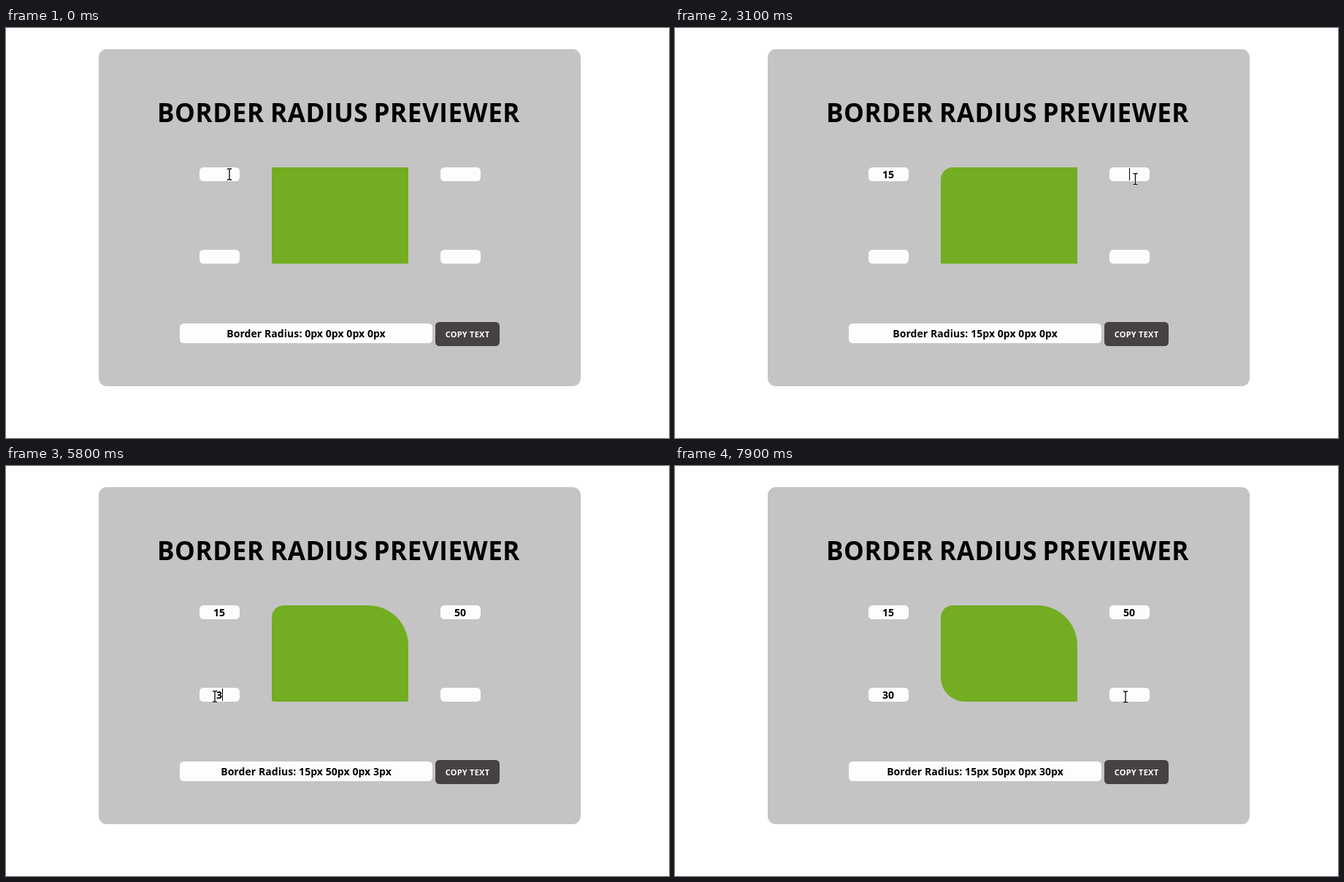
Recreate the animation shown at these times as an HTML page. Size 908x562 px, loop 8000 ms.

```html
<!DOCTYPE html>
<html lang="en">
<head>
<meta charset="utf-8">
<title>Border radius previewer</title>
<style>
  html, body { margin: 0; width: 100%; height: 100%; overflow: hidden; background: #fff; }
  div, svg { position: absolute; }
  #panel { left: 127px; top: 29px; width: 660px; height: 462px; border-radius: 11px; background: #c4c4c4; }
  #box { left: 364px; top: 191px; width: 187px; height: 132px; background: #73ad21; }
  svg { left: 0; top: 0; }
  text { font: bold 14px "Open Sans", "Noto Sans", sans-serif; letter-spacing: .07px; }
  .mid { text-anchor: middle; }
  .title { font-size: 35px; letter-spacing: .6px; }
  .copy { font-size: 11px; letter-spacing: .25px; fill: #fff; }
  .field { fill: #fffdfc; }
</style>
</head>
<body>
<div id="panel"></div>
<div id="box"></div>
<svg width="908" height="562">
  <text class="title" y="129"><tspan x="207">BORDER </tspan><tspan x="362">RADIUS </tspan><tspan x="503.5">PREVIEWER</tspan></text>
  <g class="field">
    <rect x="265" y="191" width="55" height="19" rx="5.5"/>
    <rect x="595" y="191" width="55" height="19" rx="5.5"/>
    <rect x="595" y="304" width="55" height="19" rx="5.5"/>
    <rect x="265" y="304" width="55" height="19" rx="5.5"/>
    <rect x="238" y="405" width="346" height="27" rx="5.5"/>
  </g>
  <rect x="588" y="403" width="88" height="33" rx="5.5" fill="#464241"/>
  <text class="copy mid" x="632" y="424">COPY TEXT</text>
  <text id="status" class="mid" x="411" y="424"></text>
  <text class="value mid" x="292" y="206"></text>
  <text class="value mid" x="622" y="206"></text>
  <text class="value mid" x="622" y="319"></text>
  <text class="value mid" x="292" y="319"></text>
  <rect id="caret" width="1" height="17"/>
  <g id="ibeam" fill="none">
    <path d="M-3 -7.5H-1L0 -6.5L1 -7.5H3M0 -6.5V6.5M-3 7.5H-1L0 6.5L1 7.5H3" stroke="#fff" stroke-width="2.8"/>
    <path d="M-3 -7.5H-1L0 -6.5L1 -7.5H3M0 -6.5V6.5M-3 7.5H-1L0 6.5L1 7.5H3" stroke="#111" stroke-width="1.4"/>
  </g>
  <path id="arrow" d="M.5 .5V16.5L4.3 13L7 19L9.8 17.8L7.2 12H12Z" fill="#111" stroke="#fff"/>
</svg>
<script>
const LOOP = 8000, ZOOM = 1.1;
const $ = id => document.getElementById(id);
const values = document.querySelectorAll(".value");

// [time, field, text]; fields run clockwise from the top left
const typing = [
  [1800, 0, "1"], [2100, 0, "15"], [3600, 1, "5"],
  [4000, 1, "50"], [5800, 3, "3"], [6000, 3, "30"]
];

// [from, to, x, y]
const carets = [
  [800, 1400, 292, 192], [1800, 2100, 296, 192], [2100, 2700, 301, 192],
  [3100, 3600, 622, 192], [3600, 4000, 626, 192], [4000, 4500, 631, 192],
  [5000, 5400, 631, 192], [5400, 5800, 292, 305], [5800, 6000, 296, 305],
  [6000, 6600, 301, 305], [6800, 7200, 301, 305], [7300, 7900, 622, 305]
];

// [time, x, y, shape]
const pointer = [
  [0, 306, 200.5, "ibeam"], [100, 308, 201.5, "ibeam"],
  [2300, 490, 175, "arrow"], [2400, 650, 187, "arrow"], [2600, 648, 184, "arrow"],
  [2700, 644, 195, "ibeam"], [2800, 638, 201, "ibeam"], [2900, 633, 205, "ibeam"],
  [3000, 630.5, 207, "ibeam"],
  [4500, 592, 222, "arrow"], [4600, 505, 262, "arrow"], [4700, 405, 295, "arrow"],
  [4800, 332, 306, "arrow"], [4900, 298, 317.5, "ibeam"], [5000, 286, 319.5, "ibeam"],
  [5200, 286, 316, "ibeam"],
  [6600, 450, 311, "arrow"], [6700, 545, 326, "arrow"], [6800, 602, 325, "arrow"],
  [6900, 617, 316.5, "ibeam"]
];

function draw(t) {
  const texts = ["", "", "", ""];
  for (const [at, field, text] of typing) if (t >= at) texts[field] = text;
  texts.forEach((text, i) => values[i].textContent = text);
  const radii = texts.map(Number);
  $("status").textContent = "Border Radius: " + radii.map(r => r + "px").join(" ");
  $("box").style.borderRadius = radii.map(r => r * ZOOM + "px").join(" ");

  const caret = carets.find(([from, to]) => t >= from && t < to);
  $("caret").style.display = caret ? "" : "none";
  if (caret) {
    $("caret").setAttribute("x", caret[2]);
    $("caret").setAttribute("y", caret[3]);
  }

  const [, x, y, shape] = pointer.findLast(([at]) => t >= at);
  for (const id of ["ibeam", "arrow"]) {
    $(id).style.display = id === shape ? "" : "none";
    $(id).setAttribute("transform", `translate(${x} ${y})`);
  }
}

const start = performance.now();
function tick() {
  draw((performance.now() - start) % LOOP);
  requestAnimationFrame(tick);
}
tick();
</script>
</body>
</html>
```
